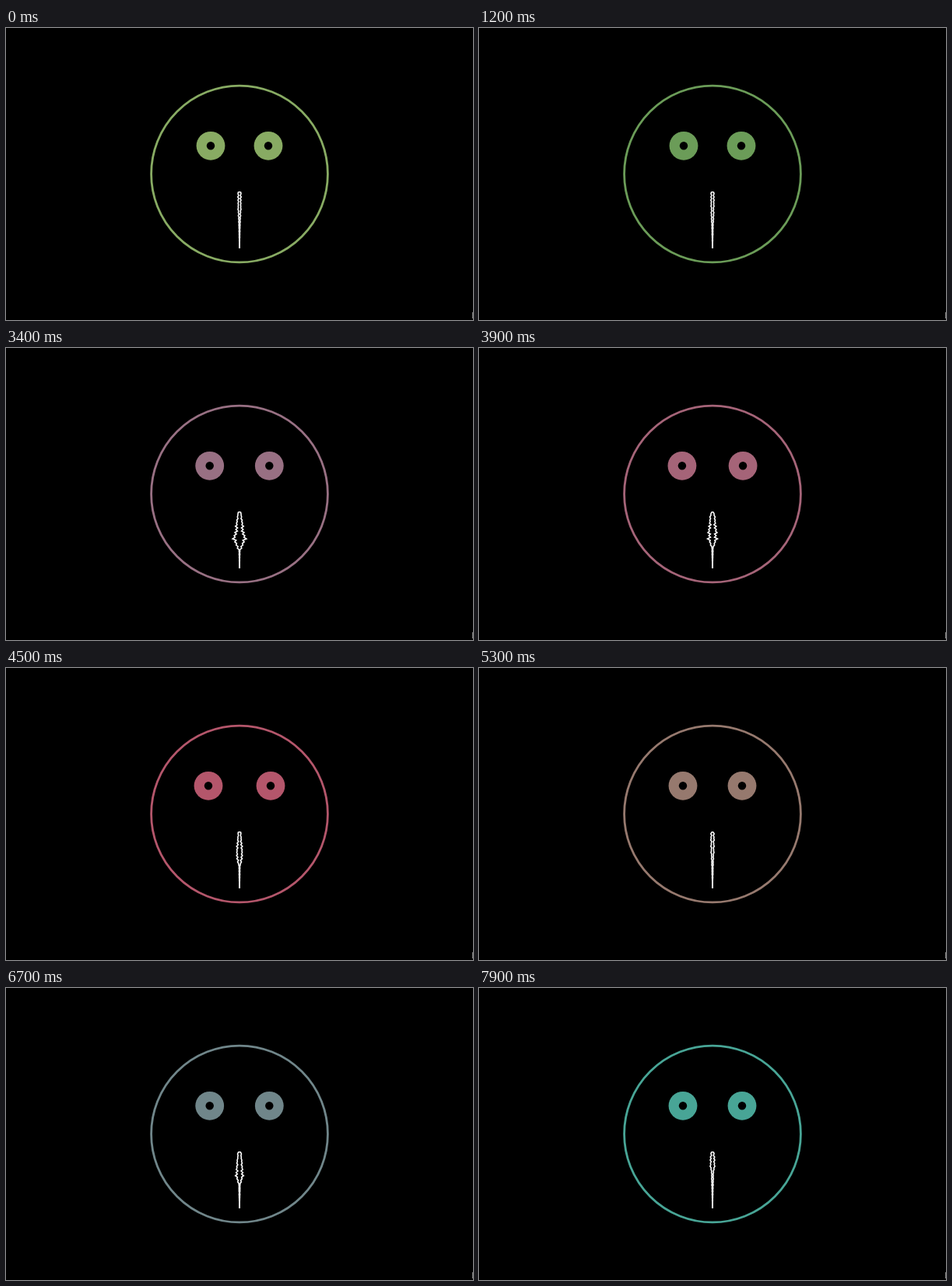
Animation of 600 by 375 pixels, one loop 8 s. Source, as an HTML page with a canvas:

```html
<!DOCTYPE html>
<html lang="en">
<head>
<meta charset="utf-8">
<title>Singing face</title>
<style>
html, body { margin: 0; height: 100%; overflow: hidden; background: #000; }
canvas { display: block; }
</style>
</head>
<body>
<canvas width="600" height="375"></canvas>
<script>
const ctx = document.querySelector('canvas').getContext('2d');
const LOOP = 8000, STEP = 100;
const CX = 300, CY = 187.5, EYE_Y = 151.3;
const MOUTH_TOP = 211, MOUTH_LENGTH = 72, ROW = 2;

// eye: distance from the middle; swell: mouth opening; at: its place along the mouth
const keys = [
  { t: 0, color: '#88ab63', eye: 37, swell: .3, at: .3 },
  { t: 1200, color: '#6b9c58', eye: 37, swell: .3, at: .4 },
  { t: 3400, color: '#987083', eye: 38.3, swell: 5.5, at: .5 },
  { t: 4500, color: '#b4566b', eye: 40, swell: 2.6, at: .42 },
  { t: 5300, color: '#96796e', eye: 38, swell: .4, at: .35 },
  { t: 6700, color: '#70868a', eye: 38.3, swell: 3, at: .4 },
  { t: 7900, color: '#48a596', eye: 38, swell: 1.2, at: .2 }
];

const mix = (a, b, k) => a + (b - a) * k;

function mixColor(a, b, k) {
  const channel = (hex, i) => parseInt(hex.substr(i, 2), 16);
  return `rgb(${[1, 3, 5].map(i => Math.round(mix(channel(a, i), channel(b, i), k)))})`;
}

function random(row, step) {
  const s = Math.sin(row * 127.1 + step * 311.7) * 43758.5453;
  return s - Math.floor(s);
}

function poseAt(t) {
  const i = Math.max(1, keys.findIndex(key => key.t >= t));
  const a = keys[i - 1], b = keys[i];
  const k = (t - a.t) / (b.t - a.t);
  const between = name => mix(a[name], b[name], k);
  return {
    color: mixColor(a.color, b.color, k),
    eye: between('eye'), swell: between('swell'), at: between('at')
  };
}

function disc(x, y, r, color) {
  ctx.fillStyle = color;
  ctx.beginPath();
  ctx.arc(x, y, r, 0, Math.PI * 2);
  ctx.fill();
}

// opens slowly down to the swell, closes quickly below it, with ragged edges
function mouthWidth(u, row, step, { swell, at }) {
  const bump = u < at ? u / at : Math.max(0, 1 - (u - at) / .18);
  const ragged = 1 + (row % 2 ? .5 : -.5) * random(row, step);
  return (1.7 * (1 - u) + swell * bump) * ragged;
}

function drawMouth(pose, step) {
  ctx.strokeStyle = '#fff';
  ctx.lineWidth = 1.6;
  for (const side of [-1, 1]) {
    ctx.beginPath();
    ctx.moveTo(CX, MOUTH_TOP - .5);
    for (let y = 0; y <= MOUTH_LENGTH; y += ROW) {
      const w = mouthWidth(y / MOUTH_LENGTH, y / ROW, step, pose);
      ctx.lineTo(CX + side * w, MOUTH_TOP + y);
    }
    ctx.stroke();
  }
}

function draw(now) {
  const step = Math.floor(now % LOOP / STEP);
  const pose = poseAt(step * STEP);

  ctx.fillStyle = '#000';
  ctx.fillRect(0, 0, 600, 375);

  ctx.strokeStyle = pose.color;
  ctx.lineWidth = 2.8;
  ctx.beginPath();
  ctx.arc(CX, CY, 113.4, 0, Math.PI * 2);
  ctx.stroke();
  for (const side of [-1, 1]) {
    const x = CX + side * pose.eye;
    disc(x, EYE_Y, 18.4, pose.color);
    disc(x, EYE_Y, 5.2, '#000');
  }
  drawMouth(pose, step);

  ctx.fillStyle = '#888';
  ctx.fillRect(599, 365, 1, 8);
  requestAnimationFrame(draw);
}
requestAnimationFrame(draw);
</script>
</body>
</html>
```
